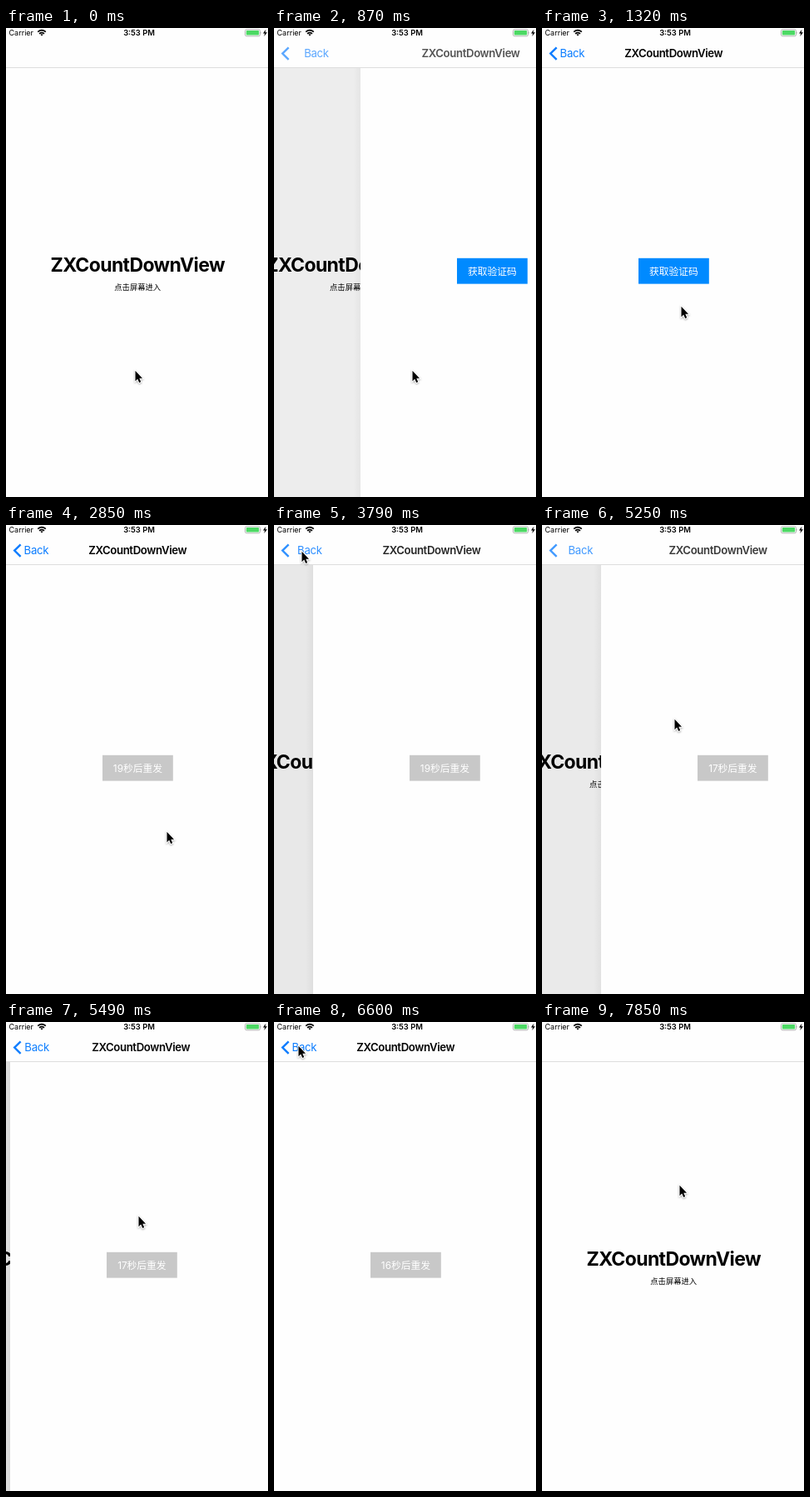
Recreate the animation shown at these times as an HTML page. Size 315 px wide and 562 px high, loop 8 s.

```html
<!DOCTYPE html>
<html lang="zh">
<head>
<meta charset="utf-8">
<title>ZXCountDownView</title>
<style>
  html, body { margin: 0; width: 100%; height: 100%; overflow: hidden; background: #fefefe; }
  svg { display: block; width: 100vw; height: 100vh; }
  text { font-family: Inter, "Noto Sans CJK SC", "Noto Sans CJK", sans-serif; }
  .mid { text-anchor: middle; }
  .status { font-size: 9px; }
  .clock { font-size: 9.4px; font-weight: 600; }
  .heading { font-size: 23px; font-weight: 700; letter-spacing: -.63px; }
  .hint { font-size: 9.3px; }
  .bar-title { font-size: 13.2px; font-weight: 600; letter-spacing: -.37px; }
  .back { font-size: 13.2px; letter-spacing: -.3px; fill: #0a7cff; }
  .label { font-size: 11.76px; fill: #fff; }
</style>
</head>
<body>
<svg viewBox="0 0 315 562" preserveAspectRatio="none">
  <defs>
    <linearGradient id="edge">
      <stop offset="0" stop-opacity="0"/>
      <stop offset="1" stop-opacity=".05"/>
    </linearGradient>
    <filter id="soft" x="-50%" y="-50%" width="200%" height="200%">
      <feDropShadow dx="0" dy="1" stdDeviation=".9" flood-opacity=".4"/>
    </filter>
  </defs>
  <rect width="315" height="562" fill="#fefefe"/>

  <g id="home">
    <text class="heading mid" x="158.2" y="292">ZXCountDownView</text>
    <text class="hint mid" x="158.2" y="314">点击屏幕进入</text>
  </g>
  <rect id="dim" y="48" width="315" height="514"/>

  <g id="detail">
    <rect id="shadow" x="-9" y="48" width="9" height="514" fill="url(#edge)"/>
    <rect y="48" width="315" height="514" fill="#fefefe"/>
    <rect id="button" x="116" y="275.8" width="84.8" height="30.8"/>
    <text id="label" class="label mid" x="158.4" y="295.6"></text>
  </g>

  <rect width="315" height="47" fill="#fefefe"/>
  <rect y="47" width="315" height="1" fill="#dedede"/>
  <path id="chevron" d="M17.6 23.3 10.2 30.6 17.6 37.9" fill="none" stroke="#0a7cff" stroke-width="2.4"/>
  <text id="back" class="back" x="21.6" y="35.3">Back</text>
  <text id="title" class="bar-title mid" x="158.2" y="35.3">ZXCountDownView</text>

  <text class="status" x="3.5" y="9.3">Carrier</text>
  <g fill="none" stroke="#000" stroke-width="1.7">
    <path d="M38.2 4.7Q43 .7 47.8 4.7M40 6.8Q43 4.4 46 6.8"/>
    <path d="M41.3 7.8Q43 6.6 44.7 7.8L43 9.6Z" fill="#000" stroke="none"/>
  </g>
  <text class="clock mid" x="160" y="9.4">3:53 PM</text>
  <rect x="287.5" y="1.8" width="18" height="8" rx="1.8" fill="none" stroke="#a5a5a5" stroke-width=".8"/>
  <rect x="288.8" y="3.1" width="15.4" height="5.4" rx=".8" fill="#4cd964"/>
  <path d="M306.4 4.3q1.2 1.5 0 3z" fill="#999"/>
  <path d="M312.4 1.8 309 6.4H311.2L310.3 10 314 5.2H311.7Z"/>

  <g id="cursor" filter="url(#soft)">
    <path d="M.5 .8V13.2L3.2 10.6 5.2 15 7.2 14.1 5.3 9.8H9Z"
          stroke="#fff" stroke-width="1.6" paint-order="stroke"/>
  </g>
</svg>
<script>
const LOOP = 8000, WIDTH = 315, PARALLAX = 0.3;
const COUNT_START = 1840, COUNT_FROM = 20;
const el = id => document.getElementById(id);
const [home, dim, detail, shadow, button, label, chevron, back, title, cursor] =
  ['home', 'dim', 'detail', 'shadow', 'button', 'label', 'chevron', 'back', 'title', 'cursor'].map(el);

// Each page change becomes visible "lead" ms into its spring.
const transitions = [
  { at: 820, lead: 122, push: true },
  { at: 3790, lead: 50, push: false },
  { at: 5160, lead: 122, push: true },
  { at: 6900, lead: 280, push: false }
];

const pointerHome = { x: 155, y: 410 };
const pointerMoves = [
  { from: 80, to: 170, x: 166, y: 410 },
  { from: 1110, to: 1320, x: 167, y: 333 },
  { from: 1380, to: 1610, x: 155, y: 291 },
  { from: 2380, to: 2500, x: 193, y: 367 },
  { from: 3150, to: 3610, x: 33, y: 31 },
  { from: 4560, to: 4860, x: 159, y: 232 },
  { from: 6070, to: 6400, x: 29, y: 28 },
  { from: 7560, to: 7720, x: 165, y: 195 }
];

const clamp = k => Math.min(1, Math.max(0, k));
const smooth = k => k * k * (3 - 2 * k);

// Critically damped spring: share of the way still to go
function remaining(ms) {
  const u = ms * 0.0133;
  const rest = (1 + u) * Math.exp(-u);
  return rest < 0.004 ? 0 : rest;
}

function pointerAt(t) {
  let { x, y } = pointerHome;
  for (const m of pointerMoves) {
    const k = smooth(clamp((t - m.from) / (m.to - m.from)));
    x += (m.x - x) * k;
    y += (m.y - y) * k;
  }
  return [x, y];
}

const move = (node, x, y = 0) => node.setAttribute('transform', `translate(${x} ${y})`);

function render(t) {
  const current = transitions.findLast(s => s.at <= t);
  const rest = current ? remaining(t - current.at + current.lead) : 0;
  const push = current ? current.push : false;
  const away = push ? rest : 1 - rest;   // 0: detail page in place, 1: off to the right
  const shown = 1 - away;

  move(home, -WIDTH * PARALLAX * shown);
  dim.setAttribute('opacity', 0.1 * shown);
  move(detail, Math.round(WIDTH * away));
  detail.style.display = away < 1 ? '' : 'none';
  shadow.setAttribute('opacity', away > 0 ? shown : 0);

  move(title, (push ? 237 : 211) * away);
  move(back, 44 * away);
  for (const node of [title, back, chevron]) node.setAttribute('opacity', shown);

  const counting = t >= COUNT_START;
  button.setAttribute('fill', counting ? '#c8c8c8' : '#008aff');
  label.textContent = counting
    ? `${COUNT_FROM - Math.floor((t - COUNT_START) / 1000)}秒后重发`
    : '获取验证码';

  move(cursor, ...pointerAt(t));
}

const start = performance.now();
function tick() {
  render((performance.now() - start) % LOOP);
  requestAnimationFrame(tick);
}
tick();
</script>
</body>
</html>
```
